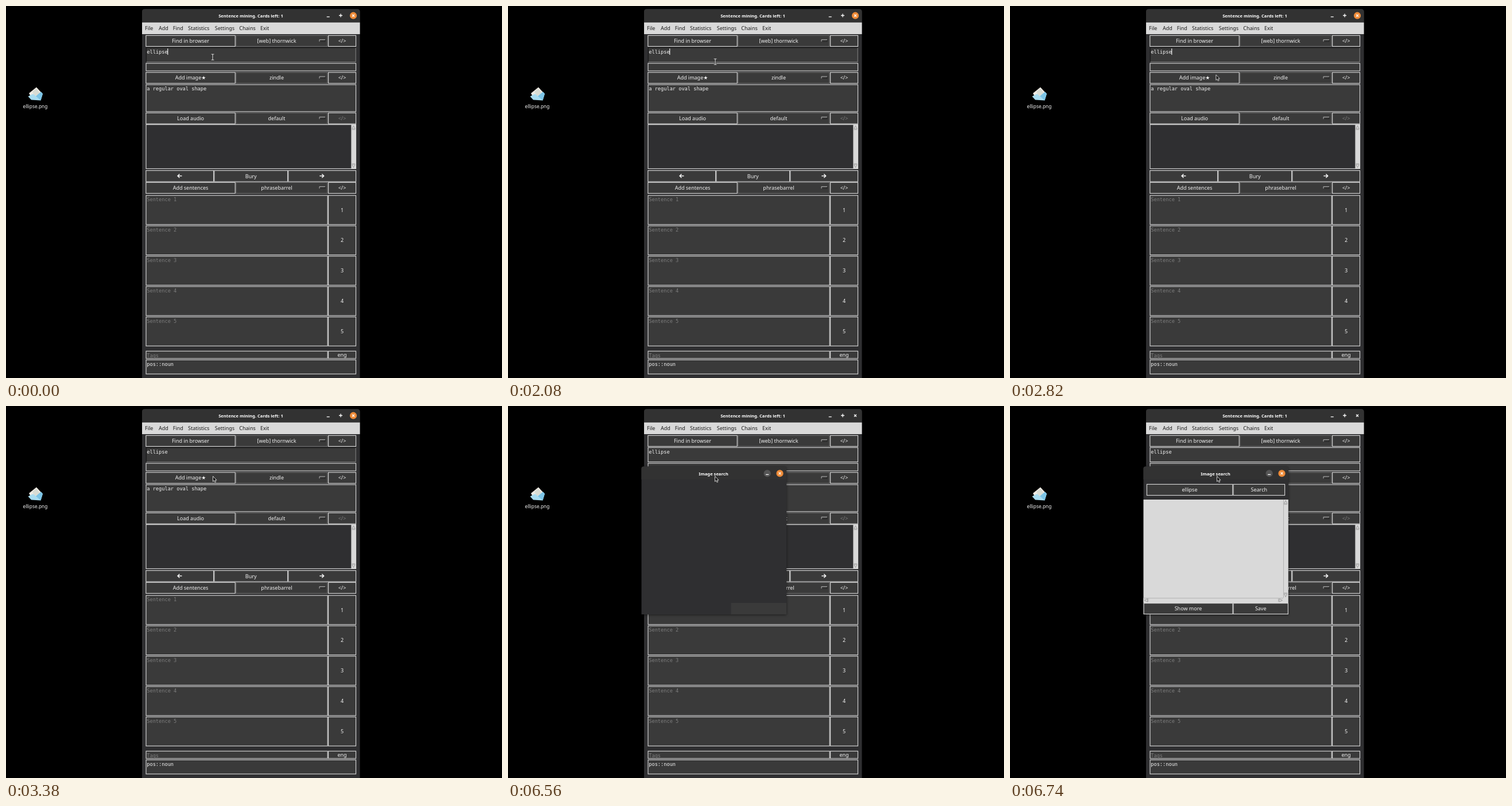
An HTML page that plays this animation: 864x648 px, repeating every 8000 ms.

```html
<!DOCTYPE html>
<html lang="en">
<head>
<meta charset="utf-8">
<title>Sentence mining</title>
<style>
html, body { margin: 0; width: 100%; height: 100%; overflow: hidden; background: #000; }
svg { display: block; width: 864px; height: 648px; }
text { font: 9px "Noto Sans", "DejaVu Sans", sans-serif; fill: #f2f2f2; white-space: pre; }
.mid { text-anchor: middle; }
.mono { font: 8.65px "DejaVu Sans Mono", monospace; }
.dim { fill: #7d7d7d; }
.title { font: bold 7.6px "Noto Sans", sans-serif; text-anchor: middle; fill: #fff; }
.menu { fill: #1c1c1c; }
.small { font-size: 8.4px; }

.caret, .blur, .press, .orange, .focus, .popup, .filled, .beam, .arrow {
  animation: 8s step-end infinite;
}
.caret { animation-name: caret; }
.press { animation-name: press; }
.orange { animation-name: orange; }
.focus { animation-name: focus; }
.blur, .popup { animation-name: popup; }
.filled { animation-name: filled; }
.beam { animation-name: beam; }
.arrow { animation-name: arrow; }
.pointer { animation: move 8s linear infinite; }

@keyframes caret {
  0% { opacity: 1; } 10.75% { opacity: 0; } 21.25% { opacity: 1; }
  42.25%, 100% { opacity: 0; }
}
@keyframes press { 0% { transform: none; } 45.25%, 100% { transform: translate(1px, 1px); } }
@keyframes orange { 0% { opacity: 1; } 50.5%, 100% { opacity: 0; } }
@keyframes focus { 0% { opacity: 1; } 82%, 100% { opacity: 0; } }
@keyframes popup { 0% { opacity: 0; } 82%, 100% { opacity: 1; } }
@keyframes filled { 0% { opacity: 0; } 82.25%, 100% { opacity: 1; } }
@keyframes beam { 0% { opacity: 1; } 30.75%, 100% { opacity: 0; } }
@keyframes arrow { 0% { opacity: 0; } 30.75%, 100% { opacity: 1; } }
@keyframes move {
  0%, 21.25% { transform: translate(360px, 89px); }
  26% { transform: translate(361px, 97px); }
  30.5% { transform: translate(361.5px, 104px); }
  31.25% { transform: translate(362px, 108px); }
  31.5%, 32.9% { transform: translate(362px, 114px); }
  35.5% { transform: translate(358px, 120px); }
  38.75%, 100% { transform: translate(360px, 122px); }
}
</style>
</head>
<body>
<svg id="stage" viewBox="0 0 864 648" xmlns="http://www.w3.org/2000/svg"></svg>
<script>
const LINE = '#d6d6d6', FACE = '#3a3a3a', BODY = '#2f2f31', LIGHT = '#d9d9d9';

const rect = (x0, y0, x1, y1, fill, extra = '') =>
  `<rect x="${x0}" y="${y0}" width="${x1 - x0}" height="${y1 - y0}" fill="${fill}" ${extra}/>`;
const box = (x0, y0, x1, y1, fill = FACE, line = LINE) =>
  rect(x0, y0, x1, y1, fill, `stroke="${line}" stroke-width="1.15"`);
const path = (d, line, width = 1, fill = 'none') =>
  `<path d="${d}" fill="${fill}" stroke="${line}" stroke-width="${width}"/>`;
const text = (x, y, s, cls = '') =>
  `<text x="${x}" y="${y}" class="${cls}">${s.replace(/</g, '&lt;').replace(/>/g, '&gt;')}</text>`;
const group = (cls, ...parts) => `<g class="${cls}">${parts.join('')}</g>`;
const button = (x0, y0, x1, y1, label, cls = '') =>
  box(x0, y0, x1, y1) + text((x0 + x1) / 2, (y0 + y1) / 2 + 3.2, label, 'mid ' + cls);
const field = (x0, y0, x1, y1, s, cls = '') =>
  box(x0, y0, x1, y1) + text(245.3, y0 + 10.4, s, 'mono ' + cls);

// Button, drop-down and code button
function row(y, label, choice, codeCls = '', labelCls = '') {
  return button(243.8, y, 399.2, y + 19, label, labelCls)
    + box(400.8, y, 560, y + 19, FACE, '#6f6f6f')
    + text(471.5, y + 12.7, choice, 'mid')
    + path(`M546 ${y + 10.5}v-3.3h10`, '#b4b4b4')
    + path(`M547 ${y + 10.5}h9v-2.5`, '#1f1f1f', .8)
    + button(561.6, y, 609.5, y + 19, '</>', codeCls);
}

const cross = (x, y, r = 2) =>
  path(`M${x - r} ${y - r}l${2 * r} ${2 * r}M${x + r} ${y - r}l${-2 * r} ${2 * r}`, '#fff', 1.3);
const disc = (x, y, fill) => `<circle cx="${x}" cy="${y}" r="6.1" fill="${fill}"/>`;
const arrowSign = (x, dir) =>
  path(`M${x + 3.7 * dir} 296h${-7.4 * dir}M${x + .3 * dir} 292.8l${3.3 * dir} 3.2l${-3.3 * dir} 3.2`, '#f4f4f4', 1.6);

function vScroll(x, y0, y1) {
  return rect(x, y0, x + 8, y1, LIGHT)
    + path(`M${x + .5} ${y0}V${y1}M${x + 1} ${y0 + 8.5}h6M${x + 1} ${y1 - 8.5}h6`, '#a9a9a9', .8)
    + path(`M${x + 1.5} ${y0 + 7}l2.7 -5.5l2.7 5.5z`, '#8e8e8e', .8)
    + path(`M${x + 1.5} ${y1 - 7}l2.7 5.5l2.7 -5.5z`, '#8e8e8e', .8);
}
function hScroll(x0, x1, y) {
  return rect(x0, y, x1, y + 8, LIGHT)
    + path(`M${x0} ${y + .5}H${x1}M${x0 + 8.5} ${y + 1}v6M${x1 - 8.5} ${y + 1}v6`, '#a9a9a9', .8)
    + path(`M${x0 + 7} ${y + 1.5}l-5.5 2.7l5.5 2.7z`, '#8e8e8e', .8)
    + path(`M${x1 - 7} ${y + 1.5}l5.5 2.7l-5.5 2.7z`, '#8e8e8e', .8);
}

function desktop() {
  return `<path d="M40 152L53 141.5L63.5 153L58 162L46 163Z" fill="#eeeae3"/>
    <path d="M46 149L53 144L59 152L50 157Z" fill="#d8dcd4"/>
    <path d="M38.5 157.5L47 153L52 157L61 149.5L64 153L60.5 164.5L44 163.5Z" fill="#a8dcf0"/>
    <path d="M52 157L61 149.5L64 153L60.5 164.5Z" fill="#7cc4e6"/>`
    + text(51, 177.6, 'ellipse.png', 'mid small');
}

function mainWindow() {
  const menu = [['File', 242], ['Add', 266], ['Find', 290.8], ['Statistics', 317],
    ['Settings', 363.8], ['Chains', 406.3], ['Exit', 443]];
  let s = `<path d="M237 648V10q0 -4.5 4.5 -4.5H612q4.5 0 4.5 4.5V648Z" fill="${BODY}"/>`
    + `<path d="M237 28.5V10q0 -4.5 4.5 -4.5H612q4.5 0 4.5 4.5V28.5Z" fill="#323232"/>`
    + text(426.5, 19.8, 'Sentence mining. Cards left: 1', 'title')
    + path('M558.7 18.8h5M580 16.5h6M583 13.5v6', '#fff', 1.3)
    + group('orange', disc(605, 16.7, '#ee8b38'))
    + cross(605, 16.7)
    + rect(237, 28.7, 616.5, 49, LIGHT)
    + menu.map(([m, x]) => text(x, 42, m, 'menu')).join('')
    + row(51.4, 'Find in browser', '[web] thornwick')
    + rect(244, 72.5, 609.5, 97.5, FACE)
    + group('focus', path('M244.3 98V72.6H609', '#191919', 1.2), path('M244.5 97.4H609.2V73', '#858585', 1))
    + group('blur', box(244, 72.4, 609.5, 97.4, 'none'))
    + text(245.3, 82.7, 'ellipse', 'mono')
    + group('caret', rect(281.2, 74, 282.3, 85, '#fff'))
    + box(244, 99.8, 609.5, 113)
    + row(115.7, 'Add image★', 'zindle', '', 'press')
    + field(244, 137, 609.5, 184, 'a regular oval shape')
    + row(186.2, 'Load audio', 'default', 'dim')
    + box(244, 206.6, 609.5, 283.4, BODY)
    + vScroll(601.3, 207, 283)
    + button(243.8, 286.6, 361.6, 306, '')
    + button(362.8, 286.6, 490.6, 306, 'Bury')
    + button(491.8, 286.6, 609.5, 306, '')
    + arrowSign(302.7, -1) + arrowSign(550, 1)
    + row(307.4, 'Add sentences', 'phrasebarrel');
  for (let i = 0; i < 5; i++) {
    const y = 330 + 52.9 * i;
    s += field(244, y, 560.2, y + 50.6, 'Sentence ' + (i + 1), 'dim')
      + button(561.6, y, 609.5, y + 50.6, String(i + 1));
  }
  return s
    + field(244, 601.2, 560.2, 614, 'Tags', 'dim')
    + button(561.6, 601.2, 609.5, 614, 'eng')
    + field(244, 616.4, 609.5, 641, 'pos::noun');
}

function searchWindow() {
  const filled = box(238.4, 136.4, 387.8, 155.6) + text(313, 149, 'ellipse', 'mid')
    + button(389, 136.4, 478.6, 155.6, 'Search')
    + rect(232.5, 163, 484.8, 343, LIGHT)
    + vScroll(476, 163, 334)
    + hScroll(232.5, 476, 334.3)
    + button(233, 343.6, 388, 362.4, 'Show more')
    + button(389, 343.6, 484.4, 362.4, 'Save');
  return group('popup',
    `<g style="filter: drop-shadow(0 1.5px 2px rgba(0,0,0,.5))">
      <path d="M232.5 363V109q0 -3.5 3.5 -3.5H481.5q3.5 0 3.5 3.5V363Z" fill="${BODY}"/></g>
    <path d="M232.5 128V109q0 -3.5 3.5 -3.5H481.5q3.5 0 3.5 3.5V128Z" fill="#323232"/>`,
    rect(388.5, 343, 485, 363, FACE),
    text(358, 120.6, 'Image search', 'title'),
    disc(451.6, 117.4, '#555'), path('M449.1 119.4h5', '#fff', 1.3),
    disc(473.5, 117.4, '#ee8b38'), cross(473.5, 117.4),
    group('filled', filled));
}

function pointer() {
  const bar = 'M-2.5 -5H2.5M-2.5 5H2.5M0 -5V5';
  return group('pointer',
    group('beam', path(bar, '#181818', 2.6), path(bar, '#f4f4f4', 1.1)),
    group('arrow', path('M.5 .3V9.6L2.6 7.7L4.1 11L5.6 10.3L4.2 7.1H6.9Z', '#e6e6e6', .9, '#101010')));
}

document.getElementById('stage').innerHTML =
  desktop() + mainWindow() + searchWindow() + pointer();
</script>
</body>
</html>
```
